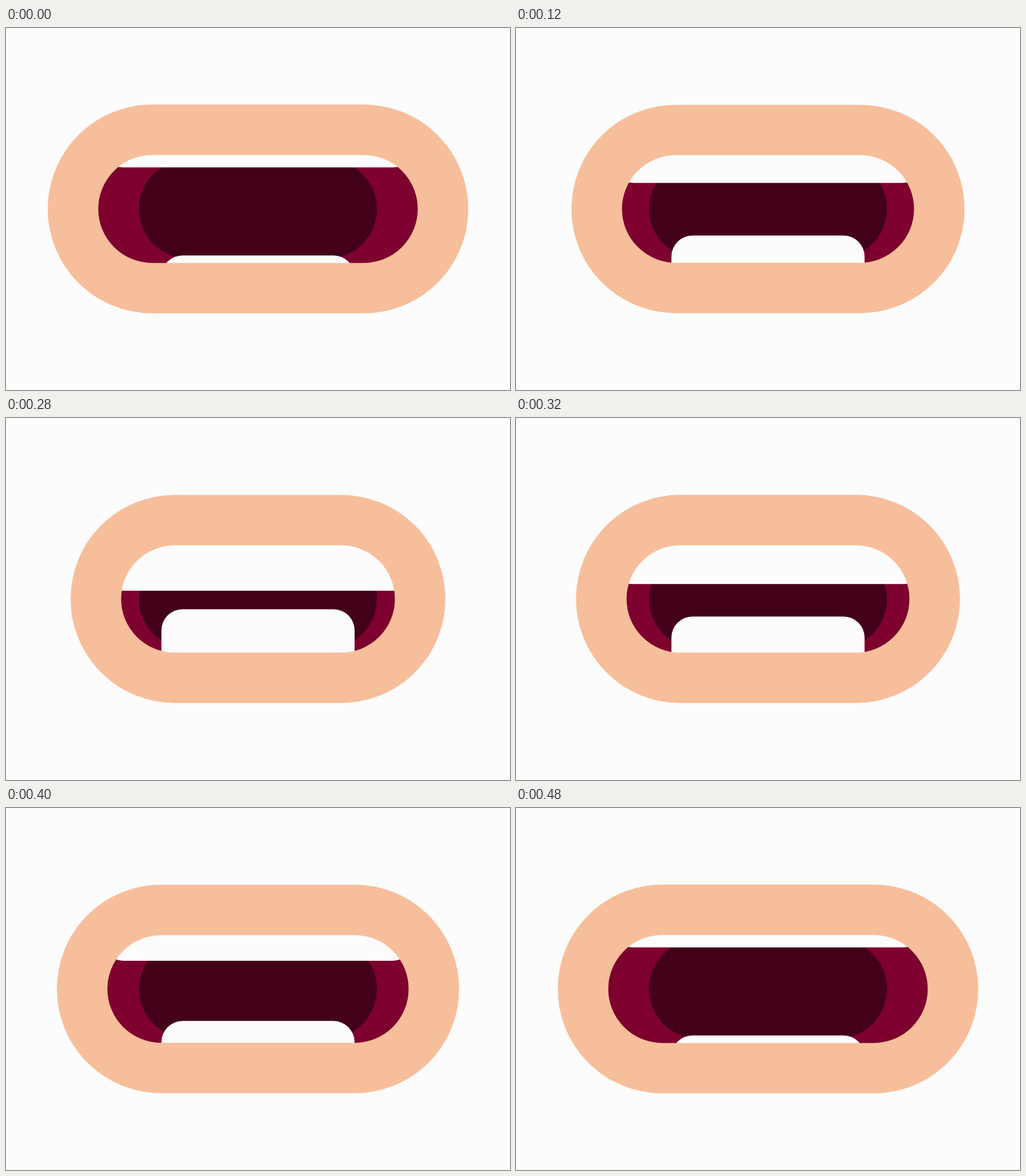
An HTML page with a canvas that plays this animation: 882 px wide and 635 px high, repeating every 0.52 s.

```html
<!DOCTYPE html>
<html lang="en">
<head>
<meta charset="utf-8">
<title>Talking mouth</title>
<style>
  html, body { margin: 0; height: 100%; overflow: hidden; background: #fcfcfc; }
  canvas { display: block; }
</style>
</head>
<body>
<canvas id="stage" width="882" height="635"></canvas>
<script>
const ctx = document.getElementById('stage').getContext('2d');
const CX = 441, CY = 317.4;
const STEP = 40, STEPS = 13, LAST = STEPS - 1;
const WHITE = '#fcfcfc', LIPS = '#f7be9b', MOUTH = '#7d002e', THROAT = '#420019';

// Linear move from `rest` to `far` at step `peak`, then linearly back.
function swing(step, rest, far, peak) {
  const k = step < peak ? step / peak : (LAST - step) / (LAST - peak);
  return rest + (far - rest) * k;
}

function roundBox(halfWidth, top, bottom, radius) {
  ctx.beginPath();
  ctx.roundRect(CX - halfWidth, top, 2 * halfWidth, bottom - top, radius);
}

function fillBox(color, ...box) {
  roundBox(...box);
  ctx.fillStyle = color;
  ctx.fill();
}

function draw(now) {
  const step = Math.floor(now / STEP) % STEPS;
  const halfWidth = swing(step, 323.75, 275.75, 6);
  const halfHeight = swing(step, 138.95, 138.15, 6);
  const upperEdge = swing(step, 244.5, 306, 6.74);
  const lowerEdge = swing(step, 399, 326, 6.25);
  const lips = [halfWidth, CY - halfHeight, CY + halfHeight, halfHeight];

  ctx.fillStyle = WHITE;
  ctx.fillRect(0, 0, 882, 635);

  ctx.save();
  roundBox(...lips);
  ctx.clip();
  fillBox(MOUTH, 400, 100, 535, 0);
  fillBox(THROAT, 208.2, CY - 87, CY + 87, 87);
  fillBox(WHITE, 273, upperEdge - 200, upperEdge, [0, 0, 37, 37]);
  fillBox(WHITE, 169, lowerEdge, lowerEdge + 200, [37, 37, 0, 0]);
  ctx.restore();

  roundBox(...lips);
  ctx.strokeStyle = LIPS;
  ctx.lineWidth = 88.4;
  ctx.stroke();
}

function tick() {
  draw(performance.now());
  requestAnimationFrame(tick);
}
tick();
</script>
</body>
</html>
```
